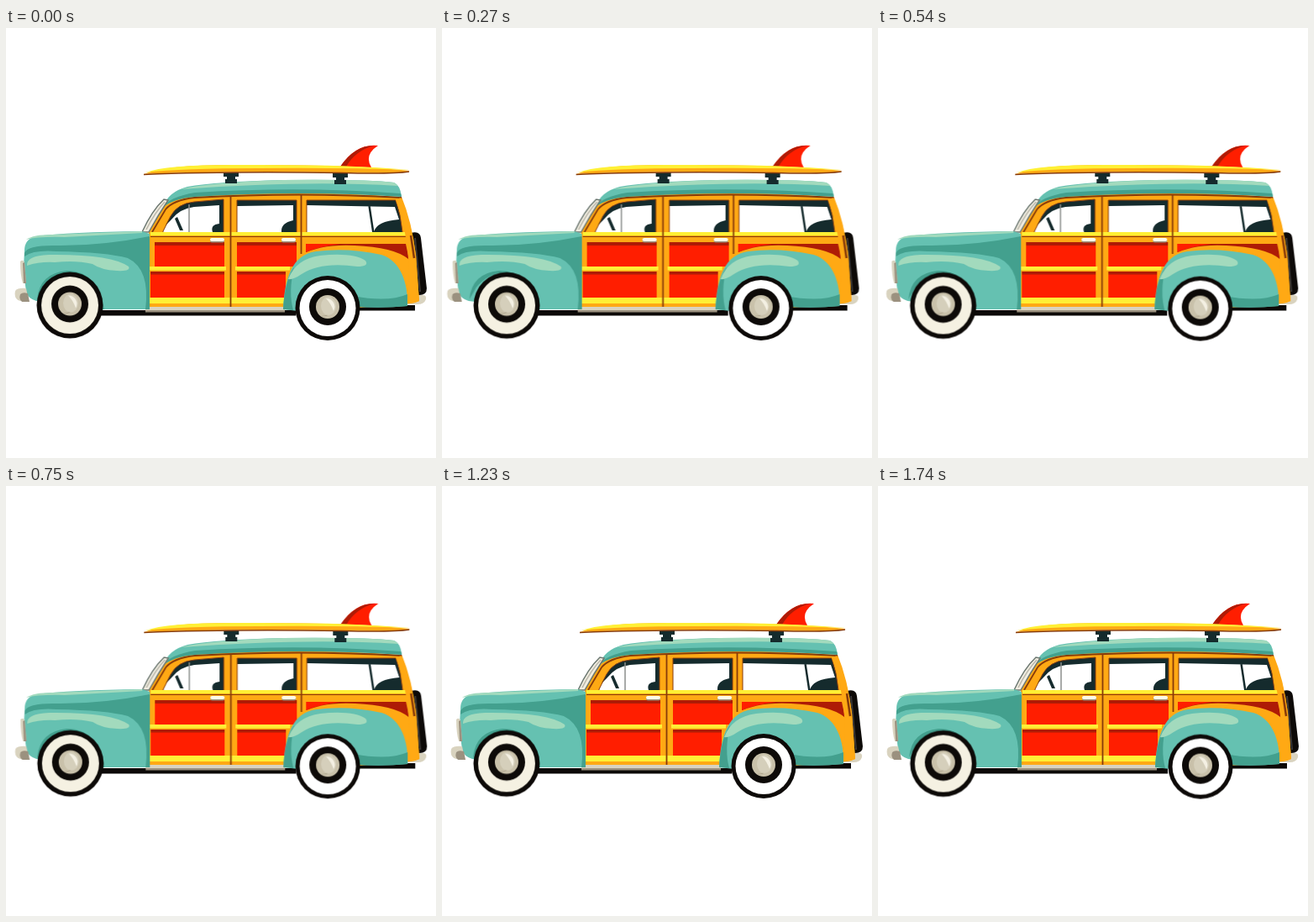
Animation of 512x512 px, one loop 1770 ms. Source, as an HTML page without scripts:

```html
<!DOCTYPE html>
<html lang="en">
<head>
<meta charset="utf-8">
<title>Woodie wagon</title>
<style>
  html, body { margin: 0; width: 100%; height: 100%; overflow: hidden; background: #fff; }
  svg { display: block; width: 100vw; height: 100vh; }
  .body, .front, .rear { animation: sway 1770ms ease-in-out infinite; }
  .front { animation-name: front; }
  .rear { animation-name: rear; }
  @keyframes sway {
    0%, 69.5% { transform: translate(0, 0); }
    15.25% { transform: translate(-4.4px, 0); }
    30.5% { transform: translate(-.7px, 0); }
    41% { transform: translate(.3px, 0); }
    54.24%, 81.36% { transform: translate(-.4px, 0); }
    98.3%, 100% { transform: translate(0, 0); }
  }
  @keyframes front {
    0%, 54.24%, 81.36% { transform: translate(0, 0); }
    15.25% { transform: translate(1px, .3px); }
    30.5% { transform: translate(1.6px, .5px); }
    69.5% { transform: translate(.9px, .3px); }
    98.3%, 100% { transform: translate(1.7px, .5px); }
  }
  @keyframes rear {
    0%, 69.5% { transform: translate(0, 0); }
    15.25% { transform: translate(-3.2px, 0); }
    30.5% { transform: translate(.7px, .6px); }
    54.24%, 81.36% { transform: translate(-.4px, -.2px); }
    98.3%, 100% { transform: translate(1px, .6px); }
  }
  .teal { fill: #65c1b1; }
  .deep { fill: #43a08e; }
  .mint { fill: #a2dabd; }
  .wood { fill: #ffa914; }
  .sun { fill: #fff035; }
  .red { fill: #ff1e00; }
  .wine { fill: #ae1b06; }
  .ink { fill: #0d0a08; }
  .dark { fill: #152b2d; }
  .chrome { fill: #d9d3bf; }
  .shade { fill: #9b917f; }
  .white { fill: #fff; }
  .seam { fill: none; stroke: #873b0a; stroke-width: 1.8; }
</style>
</head>
<body>
<svg viewBox="0 0 512 512">
  <defs>
    <g id="rack">
      <path class="dark" d="M-9 0H9V5H5V8H7V13H-7V8H-5V5H-9Z"/>
    </g>
    <g id="handle">
      <rect class="shade" y="1" width="17" height="4.5" rx="2"/>
      <rect width="17" height="4" rx="2" fill="#fffbe8"/>
    </g>
    <g id="hub">
      <circle class="ink" r="22"/>
      <circle r="14" fill="#c9c1aa"/>
      <path d="M4-13A14 14 0 0 1-8 11C6 11 11-2 4-13Z" fill="#a69c86"/>
      <ellipse cx="1" cy="-1" rx="9" ry="11" fill="#d5cfbb"/>
      <path d="M-2-10A10 10 0 0 1 7 5C5-1 2-6-2-10Z" fill="#f4f0e3"/>
    </g>
  </defs>

  <g class="body">
    <!-- spare tyre and rear bumper -->
    <path class="ink" d="M482 244Q493 241 494 250L501 310Q501 319 490 318Z"/>
    <path d="M487 250L493 314" fill="none" stroke="#3b3836" stroke-width="2"/>
    <path class="chrome" d="M477 318H496Q501 318 500 323Q498 329 490 329H477Z"/>
    <path class="ink" d="M112 336H345V342.500H112ZM417 330H487V336.500H417Z"/>

    <!-- wooden side -->
    <path class="wood" d="M170 243L187 213Q198 202 225 200Q350 192 471 201Q483 230 488 270L492 325Q484 329 476 328L420 333H170Z"/>
    <path class="seam" d="M174 243L190 216Q199 205 224 202Q350 195 471 202"/>

    <!-- windows -->
    <path class="white" d="M187 242L196 224Q204 209 224 207L259 204V243H187Z"/>
    <path class="dark" d="M190 235L196 224Q204 209 224 207L259 204V243H246Q243 234 254 233V211L224 213Q207 215 197 228ZM201 227L204 225L211 241H207Z"/>
    <path d="M218 210V243" stroke="#8b8f8d" stroke-width="1.500"/>
    <path class="white" d="M275 205H346V243H275Z"/>
    <path class="dark" d="M275 205H346V243H328Q327 232 342 229V211L275 212Z"/>
    <path class="white" d="M358 205H464Q470 222 472 243H358Z"/>
    <path class="dark" d="M358 205H464Q470 222 472 243H438Q441 230 468 228L463 213L358 211ZM431 210H433.500L438.500 243H436Z"/>
    <path d="M187 243V242L196 224Q204 209 224 207L259 204V243M275 243V205H346V243M358 243V205H464Q470 222 472 243" fill="none" stroke="#873b0a" stroke-width="1"/>

    <!-- waist rail and panels -->
    <path class="sun" d="M172 243H481V247H172Z"/>
    <path class="seam" d="M172 248.500H481" style="stroke-width:1.200"/>
    <path class="red" d="M177 255H260V284H177ZM172 290H260V321H172ZM275 255H346V284H275ZM275 290H333V321H275Z"/>
    <path class="wine" d="M177 255H260V259H177ZM172 290H260V293.500H172ZM275 255H346V259H275ZM275 290H333V293.500H275Z"/>
    <path class="sun" d="M171 284H262V288.500H171ZM273 284H338V288.500H273ZM171 321H331V328H171Z"/>
    <path class="wine" d="M357 257H476L480 276Q460 262 400 260L357 267Z"/>
    <path class="red" d="M357 257H398Q374 260 357 267Z"/>
    <path class="wood" d="M352 270Q375 257 415 259Q462 261 479 275L484 300H468Z"/>
    <path class="seam" d="M267.500 200V332M351.500 198V269"/>
    <use href="#handle" x="243" y="250"/>
    <use href="#handle" x="328" y="250"/>

    <!-- tailgate pillar -->
    <path class="wood" d="M470 202Q483 232 488 270L492 325Q485 329 477 327L480 290Q478 240 464 205Z"/>
    <path class="seam" d="M482 247L486 274" style="stroke-width:2.500"/>

    <!-- roof -->
    <path class="teal" d="M187 213Q193 195 216 189Q250 183 330 181Q430 180 462 184Q469 187 471 200Q350 192 225 200Q200 203 187 213Z"/>
    <path class="mint" d="M208 192Q240 184 330 181Q430 180 462 184L467 188Q360 181 208 192Z"/>
    <path class="deep" d="M187 213Q195 201 225 196Q350 188 470 197L471 201Q350 193 225 201Q200 203 187 213Z"/>

    <!-- windscreen -->
    <path d="M162 243Q174 217 188 204L193 205Q181 223 170 243Z" fill="#f1ede1" stroke="#6b7770" stroke-width="1.500"/>
    <path d="M167 240Q177 220 189 207" fill="none" stroke="#b9b7aa" stroke-width="1.500"/>

    <!-- running board -->
    <path class="chrome" d="M166 332H332V336H166Z"/>
    <path class="shade" d="M166 336H332V338.500H166Z"/>

    <!-- rear wing -->
    <path class="teal" d="M330 335C332 296 341 270 369 266Q406 261 447 270C470 277 479 304 478 331Q450 334 418 332L348 337Z"/>
    <path class="deep" d="M478 317L478 331Q450 334 418 332L413 319Q455 327 478 317ZM330 335Q332 300 343 285Q336 314 342 336Z"/>
    <path class="mint" d="M336 299Q345 275 374 271Q413 267 428 277Q433 284 418 284Q375 278 352 293Q342 300 336 299Z"/>

    <!-- bonnet and front wing -->
    <path class="teal" d="M22 265Q22 251 36 248Q75 243 162 242L171 245V335H115L36 325Q26 322 24 314Q20 288 22 265Z"/>
    <path class="mint" d="M24 252Q32 246 55 246L162 242V244L70 249Q38 248 24 252Z"/>
    <path class="deep" d="M22 268Q25 259 56 259Q112 260 171 248V335H166Q172 287 145 274Q120 267 60 266Q33 264 22 272Z"/>
    <path class="mint" d="M25 283Q24 271 51 270Q125 269 146 284Q149 290 132 289Q113 288 103 281Q83 276 58 279Q40 278 25 283Z"/>
    <path class="deep" d="M37 323Q40 292 72 289Q108 288 117 335L111 336L100 300Q70 280 45 309Z"/>

    <!-- lamp and front bumper -->
    <path class="chrome" d="M17 278Q20 275 22 279L24 304H20Q17 294 17 278Z"/>
    <path class="shade" d="M20 280L22 279L24 304H21Z"/>
    <path class="chrome" d="M11 313Q14 309 24 310L27 325H17Q9 323 11 313Z"/>
    <path class="shade" d="M17 317Q20 314 26 316L28 326H19Q15 323 17 317Z"/>

    <!-- surfboard -->
    <use href="#rack" x="268" y="172"/>
    <use href="#rack" x="398" y="173"/>
    <path class="red" d="M398 165Q417 137 443 140Q426 151 435 166Z"/>
    <path class="wine" d="M398 165Q415 140 438 140Q416 146 405 165Z"/>
    <path class="wood" d="M164 174Q190 163 270 163Q410 162 481 170Q472 174 400 172Q260 170 164 174Z"/>
    <path class="sun" d="M166 172Q190 163 270 163Q410 162 481 169Q400 166 300 167Q210 167 166 172Z"/>
    <path class="seam" d="M164 174.500Q260 170.500 400 172.500Q460 174 480 171" style="stroke-width:1.500"/>
  </g>

  <g class="front">
    <g transform="translate(76 330)">
      <circle class="ink" r="39.500"/>
      <circle r="34" fill="#f5f1e2"/>
      <use href="#hub" x="0" y="-1.500"/>
    </g>
  </g>
  <g class="rear">
    <g transform="translate(383 333.500)">
      <circle class="ink" r="38.500"/>
      <circle class="white" r="33.500"/>
      <use href="#hub" x="0" y="-1.500"/>
    </g>
  </g>
</svg>
</body>
</html>
```
